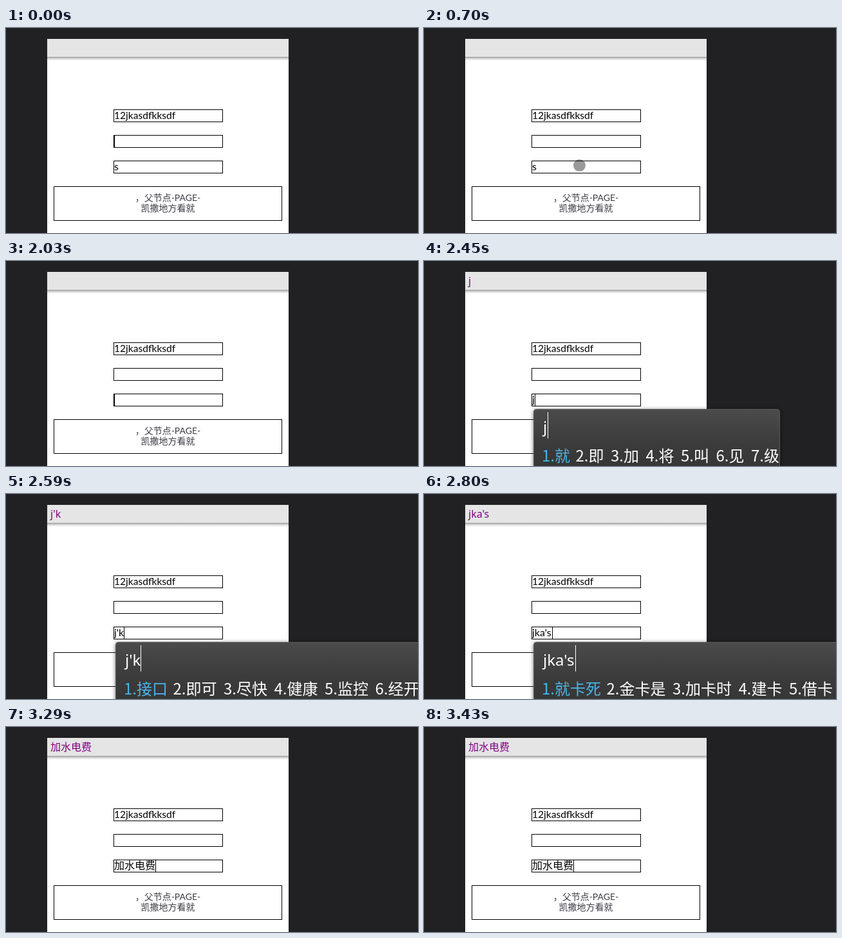
Animation, 640 px wide and 320 px high, one loop 3640 ms. Source, as an HTML page:

```html
<!DOCTYPE html>
<html lang="zh-CN">
<head>
<meta charset="utf-8">
<title>Input binding</title>
<style>
html, body { margin: 0; width: 100%; height: 100%; overflow: hidden; background: #212123; }
svg { display: block; width: 640px; height: 320px; }
text { white-space: pre; }
.box { fill: none; stroke: #000; }
.field { font: 16px Lato, "Noto Sans CJK SC", sans-serif; }
.title { font: 500 16px "Noto Sans", "Noto Sans CJK SC", sans-serif; fill: #800080; }
.label { font: 14px Lato, "Noto Sans CJK SC", sans-serif; fill: #3c3c44; text-anchor: middle; }
.typed { font: 500 24px "Noto Sans", "Noto Sans CJK SC", sans-serif; fill: #fff; }
.item { font: 500 24px "Noto Sans CJK SC", "Noto Sans", sans-serif; fill: #fff; }
.item:first-child { fill: #4ab4e8; }
#panel { filter: drop-shadow(0 1px 3px rgba(0, 0, 0, .55)); }
</style>
</head>
<body>
<svg viewBox="0 0 640 320">
  <defs>
    <linearGradient id="shade" x2="0" y2="1">
      <stop offset="0" stop-color="#999"/>
      <stop offset=".45" stop-color="#d4d4d4"/>
      <stop offset="1" stop-color="#fff"/>
    </linearGradient>
    <linearGradient id="dark" x2="0" y2="1">
      <stop offset="0" stop-color="#4b4b4b"/>
      <stop offset=".5" stop-color="#3b3b3b"/>
      <stop offset="1" stop-color="#343434"/>
    </linearGradient>
  </defs>
  <rect width="640" height="320" fill="#212123"/>
  <rect x="64" y="17" width="375" height="303" fill="#fff"/>
  <rect x="64" y="45" width="375" height="6" fill="url(#shade)"/>
  <rect x="64" y="17" width="375" height="28" fill="#e5e5e5"/>
  <text id="title" class="title" x="69" y="37"></text>

  <rect class="box" x="167.5" y="127.5" width="169" height="19"/>
  <rect class="box" x="167.5" y="167.5" width="169" height="19"/>
  <rect class="box" x="167.5" y="207.5" width="169" height="19"/>
  <text class="field" x="168" y="142" style="font-size:15.6px">12jkasdfkksdf</text>
  <text id="field" class="field" x="168" y="222"></text>
  <rect id="caret" width="1" height="18"/>

  <rect class="box" x="74.5" y="247.5" width="354" height="53"/>
  <text class="label" x="251.5" y="270">，父节点-PAGE-</text>
  <text class="label" x="251.5" y="286">凯撒地方看就</text>

  <circle id="touch" r="9.5" fill="#000" fill-opacity=".4"/>

  <g id="ime">
    <rect id="panel" x="170.5" y="231.5" height="110" rx="4" fill="url(#dark)" stroke="#5c5c5c"/>
    <text id="typed" class="typed" x="185" y="268"></text>
    <rect id="imeCaret" y="236" width="1" height="41" fill="#fff"/>
    <g id="items"></g>
  </g>
</svg>
<script>
const LOOP = 3640;
const $ = id => document.getElementById(id);

// text: third field and title; caret: [x, y] or null; ime: [caret x, right edge, candidates]
const steps = [
  { at: 0, text: "s", caret: [168, 168] },
  { at: 420, text: "s", caret: null },
  { at: 980, text: "s", title: "s", caret: [174, 208] },
  { at: 1610, text: "s", title: "s", caret: null },
  { at: 1890, text: "", title: "", caret: [168, 208] },
  { at: 2450, text: "j", caret: [172, 208], ime: [192, 553, "就 即 加 将 叫 见 级"] },
  { at: 2590, text: "j'k", caret: [183, 208], ime: [209, 700, "接口 即可 尽快 健康 监控 经开"] },
  { at: 2660, text: "jka", caret: [188, 208], ime: [218, 700, "金卡 就卡 加卡 建卡 借卡 极卡"] },
  { at: 2800, text: "jka's", caret: [199, 208], ime: [235, 700, "就卡死 金卡是 加卡时 建卡 借卡"] },
  { at: 2870, text: "jka's'd", caret: [212, 208], ime: [255, 700, "就卡死的 金卡是的 加卡时 建卡"] },
  { at: 2940, text: "jka's'd'f", caret: [221, 208], ime: [270, 700, "加水电费 就卡士大夫 金卡水电费 杰卡"] },
  { at: 3290, text: "加水电费", caret: [232, 208] }
];

// pointer positions, one every 70 ms
const TOUCH_START = 420, TOUCH_END = 1890, TICK = 70;
const path = [[292, 226], [278, 221], [264, 217], [252, 215], [241.5, 214.5],
              [234, 217], [229, 221], [226.5, 223.5]];

function show(el, on) {
  el.style.display = on ? "" : "none";
}

function place(el, x, y) {
  el.setAttribute("x", x);
  el.setAttribute("y", y);
}

function drawItems(words) {
  let x = 183;
  $("items").replaceChildren(...words.split(" ").map((word, i) => {
    const t = document.createElementNS("http://www.w3.org/2000/svg", "text");
    t.setAttribute("class", "item");
    place(t, x, 313);
    t.textContent = `${i + 1}.${word}`;
    x += word.length * 24 + (i ? 30.5 : 28.5);
    return t;
  }));
}

function drawStep(step) {
  const { text, caret, ime } = step;
  $("field").textContent = text;
  $("title").textContent = step.title ?? (step.at < 980 ? "" : text);
  show($("caret"), caret);
  if (caret) place($("caret"), ...caret);
  show($("ime"), ime);
  if (!ime) return;
  const [caretX, right, words] = ime;
  $("typed").textContent = text;
  $("imeCaret").setAttribute("x", caretX);
  $("panel").setAttribute("width", right - 171);
  drawItems(words);
}

let current;
function frame() {
  const t = performance.now() % LOOP;
  const step = steps.findLast(s => s.at <= t);
  if (step !== current) drawStep(current = step);

  const pressed = t >= TOUCH_START && t < TOUCH_END;
  show($("touch"), pressed);
  if (pressed) {
    const i = Math.min(path.length - 1, Math.floor((t - TOUCH_START) / TICK));
    $("touch").setAttribute("cx", path[i][0]);
    $("touch").setAttribute("cy", path[i][1]);
  }
  requestAnimationFrame(frame);
}
frame();
</script>
</body>
</html>
```
